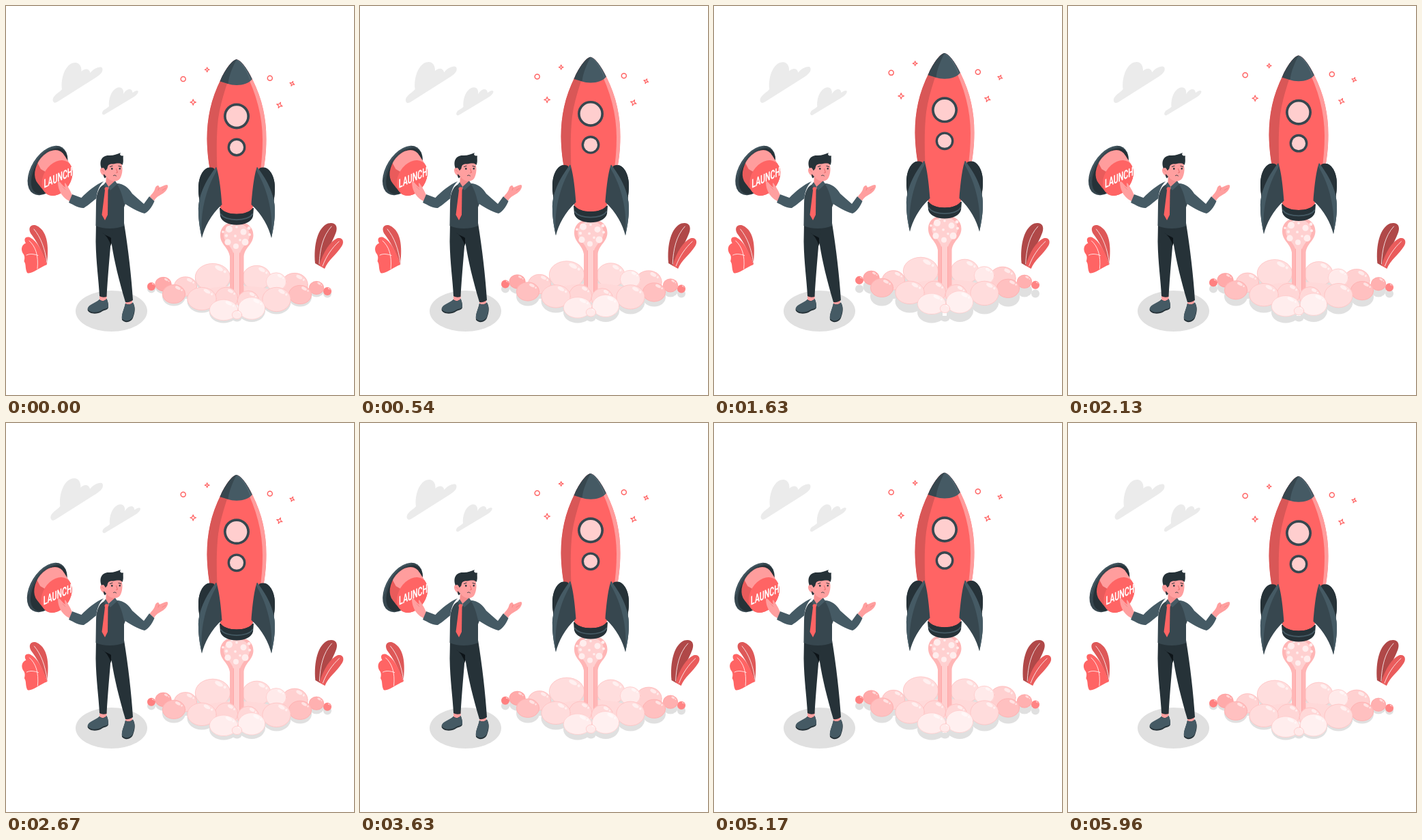
Animation of 510 by 570 pixels, one loop 6 s. Source, as an HTML page with a canvas:

```html
<!DOCTYPE html>
<html lang="en">
<head>
<meta charset="utf-8">
<title>Launch</title>
<style>
html, body { margin: 0; width: 100%; height: 100%; overflow: hidden; background: #fff; }
canvas { display: block; width: 510px; height: 570px; }
</style>
</head>
<body>
<canvas id="stage"></canvas>
<script>
const W = 510, H = 570, LOOP = 6000;
const canvas = document.getElementById('stage');
const ctx = canvas.getContext('2d');
const dpr = window.devicePixelRatio || 1;
canvas.width = W * dpr;
canvas.height = H * dpr;

const RED = '#ff6464', SKIN = '#ff9f9f', INK = '#263238', SLATE = '#37474f', STEEL = '#455a64';

function shape(d, color) {
  ctx.fillStyle = color;
  ctx.fill(new Path2D(d));
}

function line(d, color, width) {
  ctx.strokeStyle = color;
  ctx.lineWidth = width;
  ctx.lineCap = ctx.lineJoin = 'round';
  ctx.stroke(new Path2D(d));
}

function oval(x, y, rx, ry, color, tilt = 0) {
  ctx.beginPath();
  ctx.ellipse(x, y, rx, ry, tilt, 0, Math.PI * 2);
  ctx.fillStyle = color;
  ctx.fill();
}

function at(dx, dy, draw) {
  ctx.save();
  ctx.translate(dx, dy);
  draw();
  ctx.restore();
}

// Linear interpolation through [position, value] pairs
function track(keys, p) {
  let i = 1;
  while (i < keys.length - 1 && p > keys[i][0]) i++;
  const [a, va] = keys[i - 1], [b, vb] = keys[i];
  return va + (vb - va) * (p - a) / (b - a);
}

const FLOAT = [[0, 0], [.5, -10], [1, 0]];
const SWAY = [[0, 0], [.25, 1.9], [.75, -1.9], [1, 0]];
const SHAKE = [[0, 0], [.1, -1], [.2, 2], [.3, -4], [.4, 4], [.5, -4], [.6, 4], [.7, -4], [.8, 2], [.9, -1], [1, 0]];
const BEAT = [[0, 1], [.2, 1.06], [.3, 1], [.42, 1.06], [.6, 1], [1, 1]];

function clouds() {
  shape('M70 141C68 139 68 135 71 132C74 128 79 126 82 122C80 107 86 87 98 83.500C106 81 111 87 110.500 96C115 91 122 91 123.500 98C127 93 134 89 139 89.500C142 90 142 94 140.500 97C138 101 133 104 129 106.500L76 140C73 142 71 142 70 141Z', '#ebebeb');
  shape('M142 159C140 158 141 154 144 152C147 150 149 149 151 147C150 135 155 122 164 119.500C170 118 173 123 172 129C176 121 185 119 185.500 127C188 125 192 123 193.500 124.500C195 127 190 132 186 134L146 158C144 159.500 143 159.500 142 159Z', '#ebebeb');
}

function star(x, y, r, tilt) {
  ctx.save();
  ctx.translate(x, y);
  ctx.rotate(tilt);
  ctx.beginPath();
  for (let i = 0; i < 8; i++) {
    const a = i * Math.PI / 4, d = i % 2 ? r * .38 : r;
    ctx.lineTo(Math.cos(a) * d, Math.sin(a) * d);
  }
  ctx.closePath();
  ctx.lineJoin = 'round';
  ctx.strokeStyle = RED;
  ctx.lineWidth = 1.2;
  ctx.stroke();
  ctx.restore();
}

function ring(x, y) {
  ctx.beginPath();
  ctx.arc(x, y, 3.5, 0, Math.PI * 2);
  ctx.strokeStyle = RED;
  ctx.lineWidth = 1.5;
  ctx.stroke();
}

function sparkles() {
  ring(259.7, 107);
  ring(386.8, 105.8);
  star(294.7, 93.3, 3.4, 0);
  star(274.2, 141, 4.3, 0);
  star(419.3, 113.8, 3.6, .35);
  star(400.8, 145.3, 4.4, .35);
}

// Smoke puffs: x, y, rx, ry, colour
const BACK = [
  [213, 411, 6, 6, '#ff8080'], [230.5, 407.5, 12, 10.5, '#ffaaaa'], [263, 411, 17, 14.5, '#ffd3d3'],
  [303, 397.500, 26, 20.5, '#ffdddd'], [471, 418, 6, 6, '#ff8484'], [455, 413, 11, 10, '#ffb0b0'],
  [367.500, 398, 21, 18, '#ffdddd'], [423, 408, 19.500, 17, '#ffd0d0'], [396, 404, 15, 13.500, '#ffeaea']
];
const FRONT = [
  [246, 422, 17, 14, '#ffc0c0'], [431, 423, 17, 14, '#ffc0c0'],
  [323, 428, 17, 16, '#ffd6d6'], [355, 432, 16, 15, '#ffd8d8'],
  [287, 429, 21.500, 17, '#ffdcdc'], [396.500, 430, 21, 18, '#ffdcdc'],
  [319, 445.500, 21, 15.500, '#ffeded'], [360, 443, 20, 16.500, '#fff0f0'], [338.500, 452.500, 7.500, 6.500, '#ffeaea']
];

function puff([x, y, rx, ry, color]) {
  oval(x, y, rx, ry, color);
  ctx.beginPath();
  ctx.ellipse(x, y, rx - .3, ry - .3, 0, 0, Math.PI * 2);
  ctx.strokeStyle = 'rgba(255,140,140,.45)';
  ctx.lineWidth = .6;
  ctx.stroke();
  const shine = 'rgba(255,255,255,.55)';
  oval(x + rx * .35, y - ry * .64, rx * .25, ry * .15, shine, .5);
  oval(x + rx * .68, y - ry * .4, rx * .08, ry * .1, shine, .5);
}

function smokeShadow() {
  for (const [x, y, rx, ry] of [...BACK, ...FRONT]) oval(x, y + 3.5, rx, ry, '#e0e0e0');
  ctx.fillStyle = '#fff';
  ctx.fillRect(335, 449, 6, 5);
}

const BUBBLES = [
  [327, 327, 5], [348, 331, 4.5], [325, 346, 4.6], [350.500, 346, 5], [337, 352, 4], [356, 325.5, 2.4],
  [338, 324, 1.8], [318, 331, 1.8], [357, 335, 2], [336, 337, 1.9], [343, 343, 1.8], [323, 336.500, 2.2], [331, 320.5, 1.6]
];

function flame() {
  shape('M314 336C314 322 325 316 338 316C351 316 362.500 322 362.500 336C362 350 350 353 348.500 367L348.500 430L328 430L328 367C326 353 314 350 314 336Z', '#ffb6b6');
  shape('M319 336C320 324 328 319 338 319C349 319 357 325 357 336C357 346 345 352 342 365L342 430L334 430L334 365C332 352 319 346 319 336Z', '#ffd0d0');
  line('M333.500 362V430M342.500 362V430', '#ffa5a5', .8);
  for (const [x, y, r] of BUBBLES) oval(x, y, r, r, '#ffeded');
}

function fin() {
  shape('M305 238C293 232 282 246 282 267C282 279 284 289 287 297L306 270Z', INK);
  shape('M308 236C297 250 281 275 282 301C282 316 285 330 287 340C291 324 300 306 316.500 291C315 270 312 245 308 236Z', SLATE);
  shape('M308 236C297 250 281 275 282 301C282 316 285 330 287 340C284 302 293 268 309 241Z', STEEL);
}

const BODY = 'M338 78C330 80 321 94 315 107C300 137 294.500 165 294.500 195C295 235 304 266 314 295C320 308 356 308 362 295C372 268 381.500 235 381.500 195C381.500 165 376 137 361 107C355 94 346 80 338 78Z';
const NOSE = 'M338 78C330 80 321 94 315 107C324 119 352 119 361 107C355 94 346 80 338 78Z';

function rocket() {
  for (const side of [1, -1]) {
    ctx.save();
    ctx.translate(side < 0 ? 676 : 0, 0);
    ctx.scale(side, 1);
    shape('M305 238C293 232 282 246 282 267C282 279 284 289 287 297L306 270Z', INK);
    ctx.restore();
  }
  shape('M313 296L314 308C318 325 358 325 362 308L363 296Z', INK);
  line('M315 305C321 316 355 316 361 305', STEEL, 1.8);
  ctx.save();
  ctx.clip(new Path2D(BODY));
  shape(BODY, RED);
  shape('M290 70H336C329 105 316 130 311 165C307 200 308 260 318 310H290Z', '#d95757');
  shape('M350 95C367 128 376 162 376 196C376 232 370 267 358 308H390V95Z', '#ff9b9b');
  shape(NOSE, STEEL);
  shape('M338 78C332 90 327 101 325.500 114L312 110V78Z', SLATE);
  line('M339 79C348 85 354 97 358 108', '#5b707a', .8);
  ctx.restore();
  oval(338, 161.5, 19, 19, SLATE);
  oval(338, 161.5, 15.3, 15.3, '#ffcece');
  oval(338, 207, 13.4, 13.4, SLATE);
  oval(338, 207, 10, 10, '#ffcece');
  for (const side of [1, -1]) {
    ctx.save();
    ctx.translate(side < 0 ? 676 : 0, 0);
    ctx.scale(side, 1);
    fin();
    ctx.restore();
  }
}

function launch() {
  sparkles();
  BACK.forEach(puff);
  oval(340, 424, 60, 14, '#ffd9d9');
  flame();
  rocket();
  FRONT.forEach(puff);
}

function button() {
  const tilt = -1.01;
  oval(61, 241, 40, 24, SLATE, tilt);
  oval(63.5, 242, 37.5, 21, INK, tilt);
  line('M34 250C37 230 55 207 73 206', STEEL, 1.6);
  const sides = new Path2D();
  for (let i = 0; i <= 12; i++) {
    const k = i / 12, dome = new Path2D();
    dome.ellipse(65 + 10 * k, 238 + 14 * k, 29 - k, 20, tilt, 0, Math.PI * 2);
    sides.addPath(dome);
  }
  ctx.save();
  ctx.clip(sides);
  shape('M30 195H105V290H30Z', '#e95b5b');
  shape('M51 239L44 226L62 200L105 200V240L70 250Z', '#ff9d9d');
  ctx.restore();
  oval(75, 252, 28, 20, RED, tilt);
  ctx.save();
  ctx.transform(.59, -.265, 0, 1, 55.5, 267);
  ctx.font = '700 18px Roboto, Arial, sans-serif';
  ctx.fillStyle = '#fff';
  ctx.fillText('LAUNCH', 0, 0);
  ctx.restore();
}

function legs() {
  oval(154.500, 447, 52.500, 30, '#e0e0e0');
  shape('M137 422H147.500V432C144 435 139 434 137 431ZM175 430L185 429V437C182 440 178 440 175 438Z', SKIN);
  shape('M137 430C132 436 121 438 119.500 445C121 452 134 452 140 448C144 445 150 446 150 441C150 436 149 432 147.500 429C144 433 140 433 137 430Z', INK);
  shape('M137 430C132 435 121 437 119.500 443.500C122 450 134 450 140 446C144 443 150 444 150 440C150 436 149 432 147.500 429C144 433 140 433 137 430Z', STEEL);
  shape('M175 436C173 445 169 452 170 460C174 465 183 464 186 457C188 451 191 443 186 434.500C182 438 178 438 175 436Z', INK);
  shape('M175 436C173 445 169 451 170 458C174 463 183 462 186 455C188 449 190 442 186 434.500C182 438 178 438 175 436Z', STEEL);
  shape('M144 320L173 318C179 355 184 398 186 431C182 434 178 434.500 175 434C165 400 159 375 155 350L149 335Z', INK);
  shape('M132 318L131.500 345C132 377 136 402 137 425C140 427 144 427 147.500 426C149 397 152 367 154 340L158 320Z', INK);
  shape('M141 332C146 337 151 337 154 340L154 352C152 345 149 338 141 332Z', '#0d1418');
}

function torso() {
  shape('M147 247H160V262L149 268L146 263Z', '#f58d8d');
  shape('M146 261C138 262 132 272 132 290L131.500 322C143 327.500 162 327 173 322L173 295C178 285 178 267 168 261.500L160 259L150 268Z', SLATE);
  shape('M143 257C131 262 119 272 110.500 281L97 276L92 288C100 292 107 296.500 114 296C122 291 128 285 132.500 282C133 273 136 264 143 257Z', STEEL);
  shape('M162 260C173 260 180 267 185 275L202 290L210 279L217.500 286C214 295 207 303 203 304C194 302 181 294 173 289C171 281 169 270 162 260Z', STEEL);
  shape('M146 258L143 262L147 268L151 266ZM160 256L163 261L153 270L149 266Z', STEEL);
  shape('M145 270H149.500L149 306L145 314L140.500 306Z', RED);
  oval(147.3, 268, 2.8, 2.8, RED);
}

function head() {
  shape('M145 238C145 228 152 224 168 227C171.500 235 171.500 246 167 253C162 259 152 257 148 251C144 251 137.500 246 138 240C139 235 144 236 145 238Z', SKIN);
  shape('M140 238C136 228 140 218 152 219C158 219 163 217 168 215C166 218 168 220 172 219.500C171 223 173 228 170.500 233C167 229 162 231 157 231.500C151 231 149 233 148.500 238C147.500 239 146.500 241 145.500 241C144 237 142 236 140 238Z', INK);
  shape('M143 246L147 250L145 252.500C143 251 143 249 143 246Z', INK);
  line('M140.500 240.500L143.500 243', '#e87777', .7);
  oval(155.3, 238.5, 1.2, 1.4, INK);
  oval(166.8, 238.3, 1.2, 1.4, INK);
  line('M152.500 235.500L156 234.300M165 234.500L168.500 235.500', INK, 1);
  line('M161.500 238.500L163.500 244L161.500 244.300', '#e05f5f', .8);
  line('M157.500 248.500C159 247.500 160.500 248 161.500 249', INK, .9);
}

function hands() {
  shape('M97.500 278C94 270 91 265 87.500 260C85 257 86 263 87 266C82 263 78.500 255 76 258C76 264 78 272 83 278C87 283 90 284 93.500 286.500Z', SKIN);
  line('M83 265L87 269', '#ee7777', .6);
  shape('M210.500 279.500C214 275 217.500 272 218.500 267C220 263 224.500 261 224.500 266C228 265 232 262 236 262C239 263 236 270 232 273C228 277 221 278 217 285.500Z', SKIN);
  line('M224.500 266L223 270M229 270L234 267', '#ee7777', .6);
}

function leftPlant() {
  shape('M60 379C62 360 64 330 44 321.500C36 319.500 32 325 36 333C46 346 53 360 60 379Z', '#de5858');
  shape('M60 379C53 358 46 345 35 339C28 337 25.500 342 29 347.500C23 350 21.500 356 24.500 362C28 366 27.500 370 26.500 374C30 379 27.500 384 31 391C37 394 49 383 60 379Z', RED);
  line('M41 327C51 339 57 355 60 376M30 365C36 362 42 364 47 365.500M34 344C43 352 48 365 46 385', '#fff', .8);
}

function rightPlant() {
  shape('M453 377C450.500 350 457 324 472 318.500C482 316 487 322 483.500 332C477 350 466 364 460 381Z', '#b04848');
  shape('M459 380.500C465 360 475 345 485 340.500C494 338 496 346 492 352C484 365 472 372 467 385Z', '#ea5c5c');
  line('M459 378C460 357 464 337 477 323M464 381C469 367 478 354 488 345', '#fff', .8);
}

function draw(ms) {
  const long = ms % LOOP / LOOP, short = ms % 3000 / 3000;
  const shake = track(SHAKE, long), beat = track(BEAT, long);
  ctx.setTransform(dpr, 0, 0, dpr, 0, 0);
  ctx.fillStyle = '#fff';
  ctx.fillRect(0, 0, W, H);
  ctx.save();
  ctx.translate(131.5, 121);
  ctx.scale(beat, beat);
  ctx.translate(-131.5, -121);
  clouds();
  ctx.restore();
  at(shake, 0, leftPlant);
  at(shake, 0, rightPlant);
  smokeShadow();
  at(0, track(FLOAT, short), launch);
  at(track(SWAY, short), 0, button);
  legs();
  hands();
  torso();
  head();
}

const start = performance.now();
function tick() {
  draw(performance.now() - start);
  requestAnimationFrame(tick);
}
tick();
</script>
</body>
</html>
```
